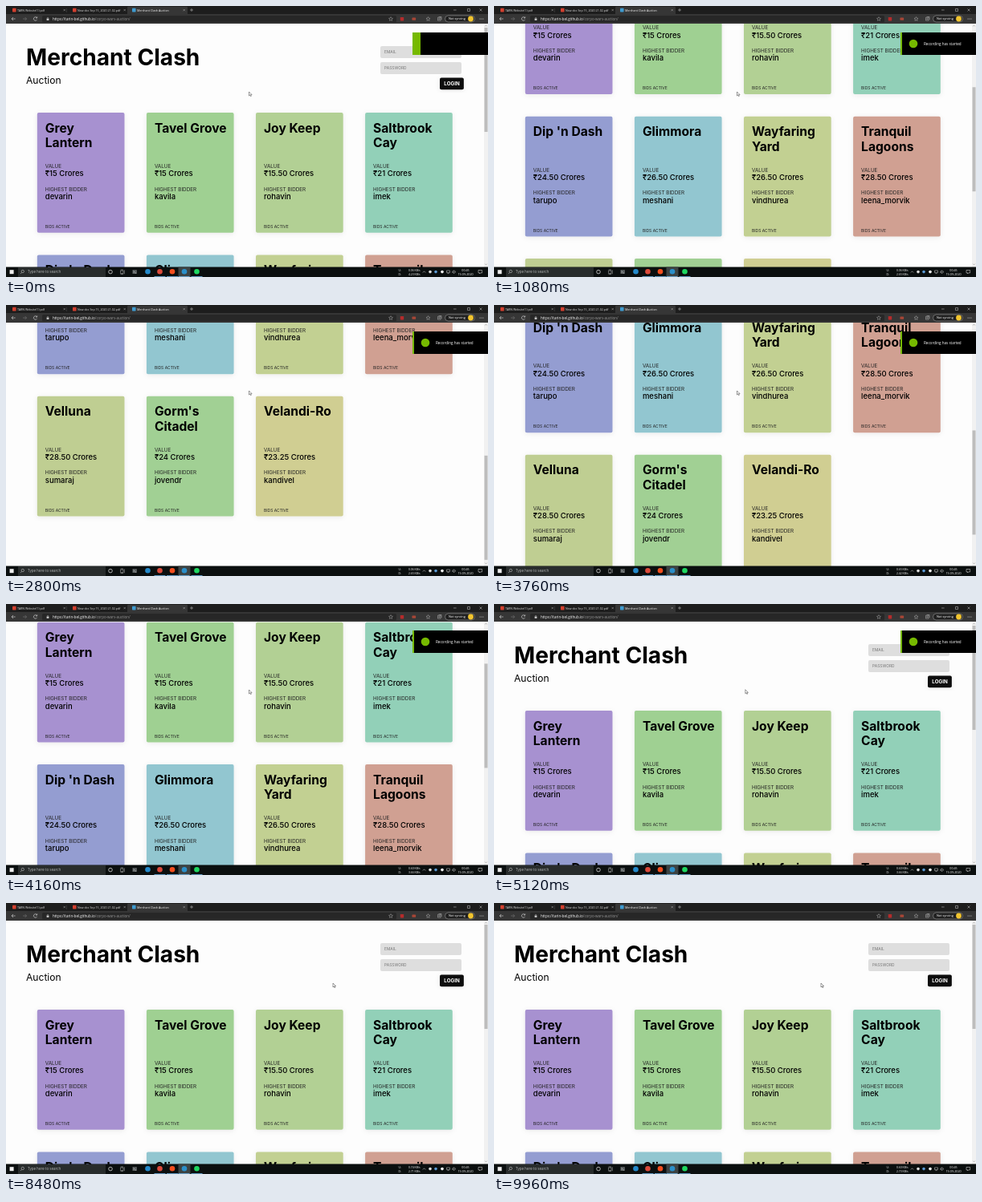
Write an HTML page that moves like this. It is 600x338 px and loops after 10 s.

```html
<!DOCTYPE html>
<html lang="en">
<head>
<meta charset="utf-8">
<title>Auction</title>
<style>
html, body { margin: 0; width: 100%; height: 100%; overflow: hidden; background: #fdfdfd; }
svg { display: block; width: 100vw; height: 100vh; }
text { white-space: pre; }
.page text { font-family: Inter, sans-serif; }
.ui text { font-family: "Open Sans", "Noto Sans", sans-serif; font-weight: 500; }
</style>
</head>
<body>
<svg id="stage" viewBox="0 0 600 338" preserveAspectRatio="none"></svg>
<script>
const LOOP = 10000;
const MAX_SCROLL = 374;

// Keyframes: [time, value]
const scrollKeys = [[0, 0], [200, 0], [1080, 172.5], [1880, 335.5], [2120, MAX_SCROLL],
  [3520, MAX_SCROLL], [3760, 301.5], [4160, 111], [4320, 0], [LOOP, 0]];
// Network rates: [time, up, down]
const rates = [[0, '0.06', '4.23'], [480, '0.06', '2.65'], [3520, '0.65', '2.42'],
  [4000, '0.60', '3.66'], [6440, '0.74', '2.71'], [9960, '0.60', '2.73']];

const cards = [
  ['Grey|Lantern', '15', 'devarin', '#a791d0'],
  ['Tavel Grove', '15', 'kavila', '#9fd092'],
  ['Joy Keep', '15.50', 'rohavin', '#b2d094'],
  ['Saltbrook|Cay', '21', 'imek', '#92d0b8'],
  ["Dip 'n Dash", '24.50', 'tarupo', '#949dd1'],
  ['Glimmora', '26.50', 'meshani', '#92c6d0'],
  ['Wayfaring|Yard', '26.50', 'vindhurea', '#c2d092'],
  ['Tranquil|Lagoons', '28.50', 'leena_morvik', '#d0a092'],
  ['Velluna', '28.50', 'sumaraj', '#bfce92'],
  ["Gorm's|Citadel", '24', 'jovendr', '#a1d094'],
  ['Velandi-Ro', '23.25', 'kandivel', '#d0ce92'],
];

const rect = (x, y, w, h, fill, more = '') =>
  `<rect x="${x}" y="${y}" width="${w}" height="${h}" fill="${fill}" ${more}/>`;
const dot = (x, y, r, fill, more = '') =>
  `<circle cx="${x}" cy="${y}" r="${r}" fill="${fill}" ${more}/>`;
const line = (d, color = '#ddd', width = 0.6) =>
  `<path d="${d}" fill="none" stroke="${color}" stroke-width="${width}"/>`;
const text = (x, y, size, str, fill = '#000', more = '') =>
  `<text x="${x}" y="${y}" font-size="${size}" fill="${fill}" ${more}>${str}</text>`;

function card([name, value, bidder, color], i) {
  const x = 38.8 + (i % 4) * 136.1, y = 133 + Math.floor(i / 4) * 177.4;
  const title = name.split('|').map((part, n) =>
    text(10, 24.5 + n * 18.6, 15.6, part, '#000', 'font-weight="700"')).join('');
  return `<g transform="translate(${x} ${y})">` +
    rect(0, 0, 108.7, 149.8, color, 'rx="2" filter="url(#shadow)"') + title +
    text(10, 69, 6.3, 'VALUE', '#222') +
    text(10, 79.4, 9.5, `₹${value} Crores`, '#000', 'font-weight="500"') +
    text(10, 97.5, 6.3, 'HIGHEST BIDDER', '#222') +
    text(10, 108, 9.5, bidder, '#000', 'font-weight="500"') +
    text(10, 144, 5, 'BIDS ACTIVE', '#222') + '</g>';
}

function input(y, label) {
  return rect(466, y, 101, 15, '#dedede', 'rx="2"') + text(471, y + 9.3, 4.9, label, '#777');
}

function page() {
  return '<g class="page"><g id="content">' +
    text(25, 74, 28.1, 'Merchant Clash', '#000', 'font-weight="700"') +
    text(25, 97, 12.1, 'Auction') +
    input(50, 'EMAIL') + input(70, 'PASSWORD') +
    '<g id="login">' + rect(540, 89.5, 29.8, 14.8, '#080808', 'rx="2" filter="url(#shadow)"') +
    text(555, 99.2, 6.25, 'LOGIN', '#fff', 'font-weight="700" text-anchor="middle"') + '</g>' +
    cards.map(card).join('') + '</g></g>' +
    rect(595, 22, 5, 304, '#f1f1f1') +
    rect(595.5, 27, 4, 130, '#bdbdbd', 'id="thumb"') +
    line('M596.3 25.4l1.2-1.2 1.2 1.2M596.3 321.6l1.2 1.2 1.2-1.2', '#777', 0.5);
}

function tab(x, title, icon, color = '#ddd') {
  return rect(x + 6, 2.8, 4.6, 4.6, icon, 'rx=".6"') + text(x + 12, 6.5, 3.6, title, color) +
    line(`M${x + 69.5} 3.9l2.4 2.4m0-2.4l-2.4 2.4`, '#ccc', 0.4);
}

function browser() {
  const star = x => line(`M${x} 13.6l.8 1.6 1.7.2-1.3 1.2.3 1.7-1.5-.8-1.5.8.3-1.7-1.3-1.2 1.7-.2z`, '#ccc', 0.4);
  return '<g class="ui">' + rect(0, 0, 600, 10.5, '#1d1d1d') + rect(0, 10, 600, 12, '#363636') +
    rect(151, 0.8, 75, 10, '#363636', 'rx="1.2"') + rect(75.5, 3, 0.3, 5, '#666') +
    tab(2, 'TARN Website(1).pdf', '#d3402f') +
    tab(77, 'New doc Sep 15, 2020 21.02.pdf', '#d3402f') +
    tab(151, 'Merchant Clash Auction', '#3f9bd0', '#fff') +
    line('M229 5h4m-2-2v4M557 5h3.6M574.5 3.5h3v3h-3zM589.5 3.5l3 3m0-3l-3 3', '#ddd', 0.45) +
    line('M11.6 16H7m2-2l-2 2 2 2') + line('M21 16h4.6m-2-2l2 2-2 2', '#777') +
    line('M38.4 14.7a2.2 2.2 0 1 0 .2 2.2M38.7 13.4v1.6h-1.7') +
    rect(45, 12, 441, 8.2, '#272727', 'rx="1.5"') +
    rect(50.6, 15.6, 2.8, 2.3, '#ccc') + line('M51.2 15.8v-.8a.8.8 0 0 1 1.6 0v.8', '#ccc', 0.4) +
    text(58, 17.7, 4.5, '<tspan fill="#fff">https://tarin-bel.github.io</tspan>/corpo-wars-auction/', '#999') +
    star(479) + star(525.5) +
    rect(490.8, 14, 4.4, 4.4, '#b52b2b', 'rx=".6"') + rect(505.5, 14.6, 4.6, 3.2, '#a84636', 'rx=".6"') +
    line('M537.5 14.3h3.6v3.8h-3.6zM538.6 13.5h3.4v3.6M539.3 15.3v1.8m-.9-.9h1.8', '#ddd', 0.4) +
    rect(546.5, 12, 37, 8, '#202020', 'rx="4" stroke="#bbb" stroke-width=".45"') +
    text(551, 17.4, 3.8, 'Not syncing', '#fff') + dot(578.5, 16, 3.4, '#f3c52f') +
    [590, 592, 594].map(x => dot(x, 16, 0.5, '#ddd')).join('') + '</g>';
}

function taskbar() {
  const apps = [[176.5, '#2489ca'], [191.5, '#db4a3b'], [207, '#f24e1e'], [222, '#2b8fc9'], [237.5, '#1ed760']];
  const tray = [[528, '#ddd'], [535, '#5c9bd5'], [543, '#fff']];
  return '<g class="ui">' + rect(0, 325.5, 600, 12.5, '#0b0f0f') +
    rect(4.6, 329.2, 5, 5, '#eee') + rect(15, 326, 109, 12, '#282c2c') +
    dot(20.8, 331, 1.7, 'none', 'stroke="#ddd" stroke-width=".5"') + line('M19.6 332.3l-1.6 1.7', '#ddd', 0.5) +
    text(27, 333.3, 4.5, 'Type here to search', '#b5b8b8') +
    dot(130, 331.6, 2.3, 'none', 'stroke="#eee" stroke-width=".7"') +
    line('M142.6 330h3.4v3.6h-3.4zM147.3 329.3v5M142.6 329h3.4M142.6 334.6h3.4', '#ddd', 0.45) +
    rect(157.5, 329.2, 5.4, 4.8, '#5a5f60') + line('M158.5 330.4l1.2 1.1-1.2 1.1M160.3 333h1.6', '#fff', 0.4) +
    rect(214.5, 325.5, 15, 12.5, '#3c4242') +
    apps.map(([x, c]) => dot(x, 331.3, 3.3, c)).join('') +
    [184.5, 200, 214.5, 230.5].map(x => rect(x, 337.2, 14, 0.8, '#76b9ed')).join('') +
    text(488.5, 331.2, 3.4, 'U:', '#fff') + text(488.5, 336.2, 3.4, 'D:', '#fff') +
    text(501, 331.2, 3.4, '', '#fff', 'id="up"') + text(501, 336.2, 3.4, '', '#fff', 'id="down"') +
    line('M518.8 332.5l1.7-1.7 1.7 1.7', '#eee', 0.5) +
    tray.map(([x, c]) => dot(x, 331.6, 1.8, c)).join('') +
    line('M548.5 330h4v2.6h-4zM549.5 333.6h2M555.7 330.8h1l1.2-1v3.8l-1.2-1h-1zM559 330.4q1 1.2 0 2.4', '#eee', 0.45) +
    text(572, 330.9, 3.7, '00:45', '#fff', 'text-anchor="middle"') +
    text(572, 336.2, 3.7, '19-09-2020', '#fff', 'text-anchor="middle"') +
    line('M588 329.5h4.6v3.4h-2l-1 1.1v-1.1H588z', '#eee', 0.5) + '</g>';
}

function notice() {
  return '<g id="notice" class="ui">' + rect(506, 33, 94, 28, '#76b900') +
    rect(516, 33, 94, 28, '#000', 'id="panel"') +
    '<g id="message">' + dot(522, 47, 5.3, '#76b900') +
    text(535, 48.8, 4.6, 'Recording has started', '#fff') + '</g></g>';
}

const cursor = '<g id="cursor" stroke="#222" stroke-width=".45" fill="#fff" stroke-linejoin="round">' +
  '<path id="arrow" d="M0 0v5l1.2-1.1.8 1.8.8-.4-.8-1.7h1.6z"/>' +
  '<path id="hand" d="M-.6 3V.4Q0-.4.6.4V2.2l2 .5q.6.2.5 1L2.6 6H-.4L-2 3.8q0-.8.7-.5z"/></g>';

const stage = document.getElementById('stage');
stage.innerHTML = '<defs><filter id="shadow" x="-20%" y="-20%" width="140%" height="140%">' +
  '<feDropShadow dx="0" dy="1.2" stdDeviation="3.2" flood-opacity=".08"/></filter></defs>' +
  rect(0, 0, 600, 338, '#fdfdfd') + page() + browser() + taskbar() + notice() + cursor;

const part = {};
stage.querySelectorAll('[id]').forEach(el => part[el.id] = el);

const progress = (t, from, to) => Math.min(1, Math.max(0, (t - from) / (to - from)));
const ease = p => p * p * (3 - 2 * p);
const move = (el, x, y) => el.setAttribute('transform', `translate(${x} ${y})`);

function keyed(keys, t) {
  const i = keys.findIndex(k => k[0] > t);
  const [t0, a] = keys[i - 1], [t1, b] = keys[i];
  return a + (b - a) * progress(t, t0, t1);
}

function draw(t) {
  const scroll = keyed(scrollKeys, t);
  move(part.content, 0, -scroll);
  move(part.thumb, 0, scroll * 0.43);

  const there = ease(progress(t, 4960, 6280)), back = ease(progress(t, 6960, 7960));
  const x = 302.5 + 252 * there - 147.5 * back;
  const y = 107 - 6 * there - back;
  const hover = x > 540;
  move(part.cursor, x, y);
  part.arrow.style.display = hover ? 'none' : '';
  part.hand.style.display = hover ? '' : 'none';
  move(part.login, hover ? -1 : 0, hover ? -1 : 0);

  const open = ease(progress(t, 0, 320)) - ease(progress(t, 5600, 5840));
  part.panel.setAttribute('x', 516 - 8 * open);
  part.message.setAttribute('opacity', progress(t, 240, 520) - progress(t, 5560, 5760));
  move(part.notice, 94 * ease(progress(t, 5840, 6280)), 0);

  const [, up, down] = rates.filter(r => r[0] <= t).pop();
  part.up.textContent = up + ' KB/s';
  part.down.textContent = down + ' KB/s';
}

const start = performance.now();
function tick() {
  draw((performance.now() - start) % LOOP);
  requestAnimationFrame(tick);
}
tick();
</script>
</body>
</html>
```
